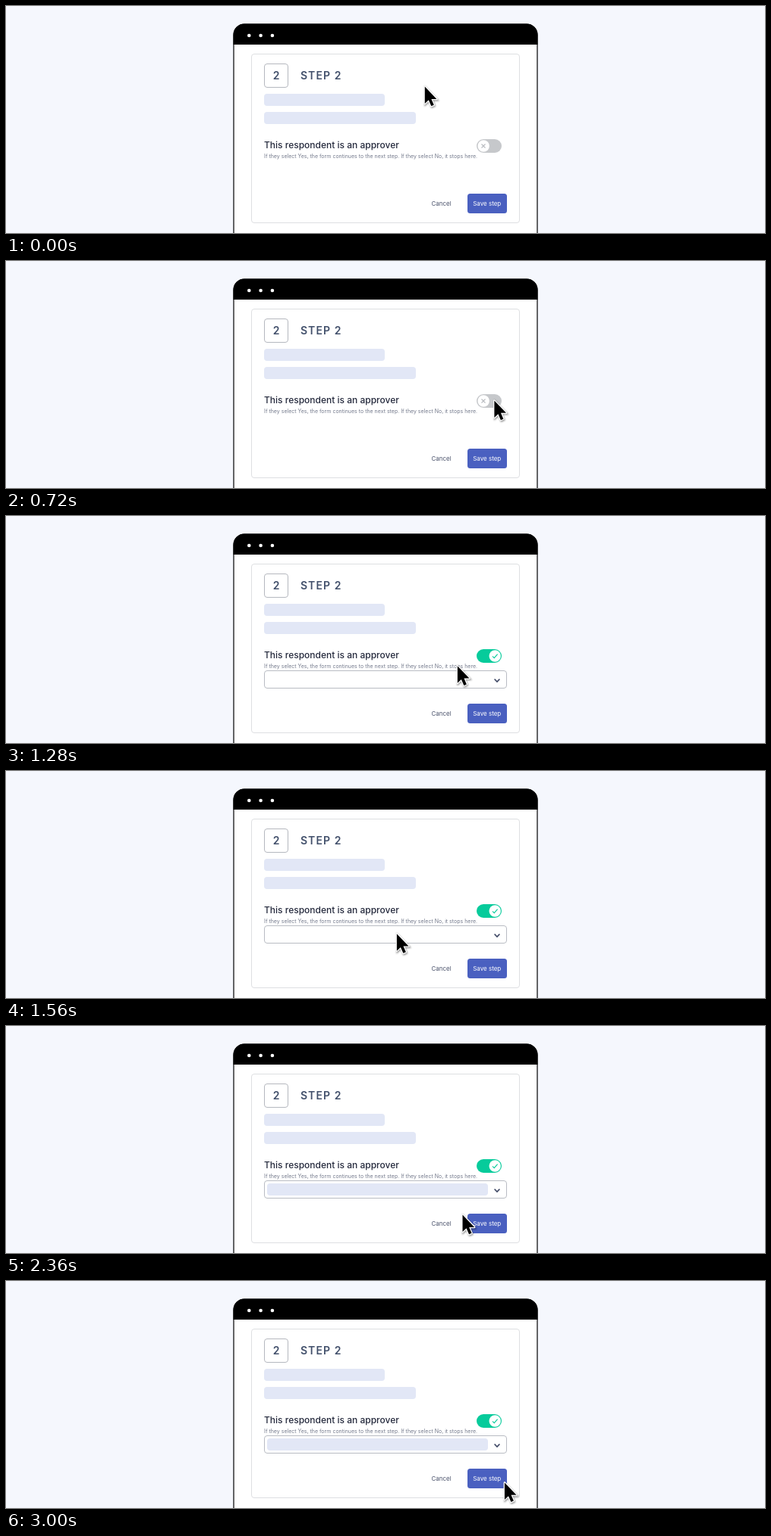
Recreate the animation shown at these times as an HTML page. Size 1000 px wide and 300 px high, loop 4.04 s.

```html
<!DOCTYPE html>
<html lang="en">
<head>
<meta charset="utf-8">
<title>Approver step</title>
<style>
  html, body { margin: 0; width: 100%; height: 100%; overflow: hidden; background: #f5f7fd; }
  svg { display: block; width: 100vw; height: 100vh; }
  text { font-family: Inter, sans-serif; }
</style>
</head>
<body>
<svg viewBox="0 0 1000 300">
  <defs>
    <filter id="soft" x="-50%" y="-50%" width="200%" height="200%">
      <feGaussianBlur stdDeviation="0.9"/>
    </filter>
    <path id="arrow" d="M.6 .8V23.2L5.6 18.5L9.1 26.4L12.6 24.9L9.2 17.1H16.2Z"/>
  </defs>

  <!-- window -->
  <path d="M300 320V38a14 14 0 0 1 14-14H686a14 14 0 0 1 14 14V320Z" fill="#fff" stroke="#000" stroke-width="1.2"/>
  <path d="M299.5 51V38a14.5 14.5 0 0 1 14.5-14.5H686a14.5 14.5 0 0 1 14.5 14.5V51Z"/>
  <g fill="#fff">
    <circle cx="320.3" cy="39" r="2.3"/>
    <circle cx="335.6" cy="39" r="2.3"/>
    <circle cx="350.9" cy="39" r="2.3"/>
  </g>

  <!-- card -->
  <rect x="323.5" y="63.5" width="353" height="223" rx="3.5" fill="#fff" stroke="#dedfe2"/>
  <rect x="340.5" y="76.5" width="31" height="31" rx="3.5" fill="#fff" stroke="#b5b8bf"/>
  <g fill="#42506b" font-size="14" font-weight="600">
    <text x="356" y="97" text-anchor="middle">2</text>
    <text x="388" y="97" letter-spacing="1.1">STEP 2</text>
  </g>
  <g fill="#e2e7f6">
    <rect x="340" y="116" width="159" height="16" rx="4"/>
    <rect x="340" y="140" width="200" height="16" rx="4"/>
  </g>
  <text x="340" y="188.4" font-size="12" font-weight="500" fill="#252a3d">This respondent is an approver</text>
  <text x="340" y="200.5" font-size="7" fill="#747a8c">If they select Yes, the form continues to the next step. If they select No, it stops here.</text>

  <!-- toggle -->
  <g id="off">
    <rect x="620" y="176" width="33" height="18" rx="9" fill="#c6c8cb"/>
    <circle cx="629.2" cy="185" r="7.7" fill="#fff"/>
    <path d="M626.5 182.5l5 5m0-5l-5 5" stroke="#b9bcc0" stroke-width="1.1"/>
  </g>
  <g id="on">
    <rect x="620" y="176" width="33" height="18" rx="9" fill="#06cb9b"/>
    <circle cx="644.2" cy="185" r="7.7" fill="#fff"/>
    <path d="M641 185.4l2.2 2.3l4.4-5" fill="none" stroke="#06cb9b" stroke-width="1.1"/>
    <rect x="340.5" y="204.5" width="319" height="23" rx="3.5" fill="#fff" stroke="#b9bcc3"/>
    <path d="M643.6 215.5l3.4 3.5l3.4-3.5" fill="none" stroke="#3f4865" stroke-width="1.7"/>
  </g>
  <rect id="choice" x="344" y="208" width="291" height="16" rx="4" fill="#e2e7f6"/>

  <!-- buttons -->
  <rect x="608" y="248" width="52" height="26" rx="3.5" fill="#4a60c0"/>
  <g font-size="8" text-anchor="middle">
    <text x="573.5" y="264" fill="#4a526b">Cancel</text>
    <text x="633.7" y="264" fill="#fff">Save step</text>
  </g>

  <g id="cursor">
    <use href="#arrow" x="0.8" y="1.3" stroke="#000" stroke-width="2.4" opacity="0.45" filter="url(#soft)"/>
    <use href="#arrow" fill="#fff" stroke="#fff" stroke-width="2.6" stroke-linejoin="round"/>
    <use href="#arrow"/>
  </g>
</svg>
<script>
  const LOOP = 4040, TICK = 40, LEG = 1000;
  const stops = [[551.2, 105.8], [646, 186.5], [499, 217.7], [656.3, 265.7]];
  const byId = id => document.getElementById(id);
  const cursor = byId("cursor"), off = byId("off"), on = byId("on"), choice = byId("choice");

  // cubic-bezier(.5, 0, 0, 1), solved by bisection
  function ease(x) {
    let lo = 0, hi = 1;
    for (let i = 0; i < 30; i++) {
      const s = (lo + hi) / 2;
      if (1.5 * s * (1 - s) ** 2 + s ** 3 < x) lo = s; else hi = s;
    }
    return lo * lo * (3 - 2 * lo);
  }

  const show = (el, yes) => el.setAttribute("visibility", yes ? "visible" : "hidden");

  function draw(ms) {
    const t = Math.min(Math.floor((ms % LOOP) / TICK) * TICK, 3 * LEG);
    const leg = Math.min(Math.floor(t / LEG), 2);
    const k = ease(t / LEG - leg);
    const [x, y] = stops[leg].map((a, i) => a + (stops[leg + 1][i] - a) * k);
    cursor.setAttribute("transform", `translate(${x.toFixed(2)} ${y.toFixed(2)})`);
    show(off, t < LEG);
    show(on, t >= LEG);
    show(choice, t >= 2 * LEG);
  }

  let start;
  function loop(now) {
    start ??= now;
    draw(now - start);
    requestAnimationFrame(loop);
  }
  draw(0);
  requestAnimationFrame(loop);
</script>
</body>
</html>
```
